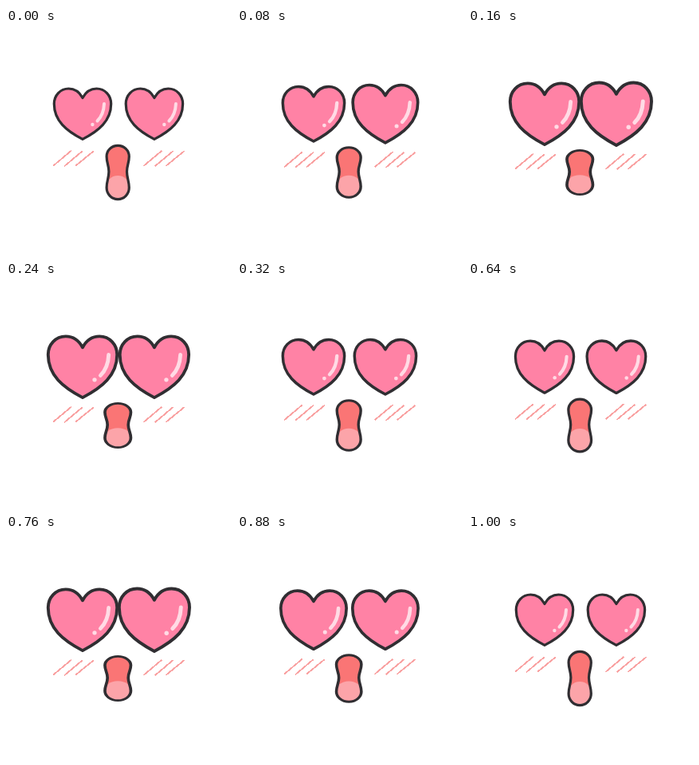
These frames come from a looping animation (282 by 282 pixels, 1.6 s). An HTML page:

```html
<!DOCTYPE html>
<html lang="en">
<head>
<meta charset="utf-8">
<title>Heart eyes</title>
<style>
  html, body { margin: 0; width: 100%; height: 100%; overflow: hidden; background: #fff; }
  svg { display: block; width: 100%; height: 100%; }
  .outline { stroke: #302e32; stroke-width: 3.2; stroke-linejoin: round; }
  .shine { fill: none; stroke: #ffdbe5; stroke-width: 4; stroke-linecap: round; }
  #blush { fill: none; stroke: #f9a3a3; stroke-width: 1.9; stroke-linecap: round; shape-rendering: crispEdges; }
</style>
</head>
<body>
<svg viewBox="0 0 282 282">
  <defs>
    <g id="heart">
      <path class="outline" fill="#ff82a5" d="M0-20C-4-27.5-10-31.5-17.5-31.5C-28-31.5-35.7-23-35.7-12.5C-35.7 9-20 21.5 0 31.9C20 21.5 35.7 9 35.7-12.5C35.7-23 28-31.5 17.5-31.5C10-31.5 4-27.5 0-20Z"/>
      <path class="shine" d="M27-12.5Q26.5 1 18.5 9"/>
      <circle cx="12.4" cy="13.5" r="2.2" fill="#ffdbe5"/>
    </g>
    <path id="lips" d="M0-33.6C8-33.6 14.1-27.5 14.1-20C14.1-12 11.3-9 11.3-1C11.3 7 14.1 11 14.1 19C14.1 27 8 33.6 0 33.6C-8 33.6-14.1 27-14.1 19C-14.1 11-11.3 7-11.3-1C-11.3-9-14.1-12-14.1-20C-14.1-27.5-8-33.6 0-33.6Z"/>
    <clipPath id="inside"><use href="#lips"/></clipPath>
    <path id="dashes" d="M0 18L21.5 0M14 18.5L35.5.5M28 18L49.5.5"/>
  </defs>
  <g id="blush">
    <use href="#dashes" x="59.7" y="154.3"/>
    <use href="#dashes" x="173.2" y="154.3"/>
  </g>
  <g id="mouth">
    <use href="#lips" fill="#fa7575"/>
    <circle cy="19" r="15" fill="#fca4a9" clip-path="url(#inside)"/>
    <use href="#lips" class="outline" fill="none"/>
  </g>
  <use id="left" href="#heart"/>
  <use id="right" href="#heart"/>
</svg>
<script>
  const STEP = 40, LOOP = 40, SECOND_BEAT = 15, BEAT = 10, PEAK = 5;
  const part = id => document.getElementById(id);
  const [left, right, mouth, blush] = ['left', 'right', 'mouth', 'blush'].map(part);
  const clamp = x => Math.min(1, Math.max(0, x));
  const smooth = x => x * x * (3 - 2 * x);
  const smoother = x => x * x * x * (x * (6 * x - 15) + 10);
  const place = (el, x, y, sx, sy = sx) =>
    el.setAttribute('transform', `translate(${x} ${y}) scale(${sx} ${sy})`);

  const start = performance.now();

  function draw() {
    const step = Math.floor((performance.now() - start) / STEP) % LOOP;
    const k = Math.min(BEAT, step < SECOND_BEAT ? step : step - SECOND_BEAT);
    const fall = smooth(clamp((BEAT - k) / PEAK));
    const pulse = k < PEAK ? smooth(k / PEAK) : fall;
    // The right eye swells sooner, then falls with the left one.
    const quick = k < PEAK ? smoother(clamp(k / 3.6)) : fall;

    place(left, 96, 107.5, 1 + 0.235 * pulse);
    place(right, 185.9, 107.5, 1 + 0.235 * quick);
    place(mouth, 140.2, 181, 1 + 0.17 * pulse, 1 - 0.2 * pulse);
    place(blush, 0, 4.4 * pulse, 1);
    requestAnimationFrame(draw);
  }
  draw();
</script>
</body>
</html>
```
